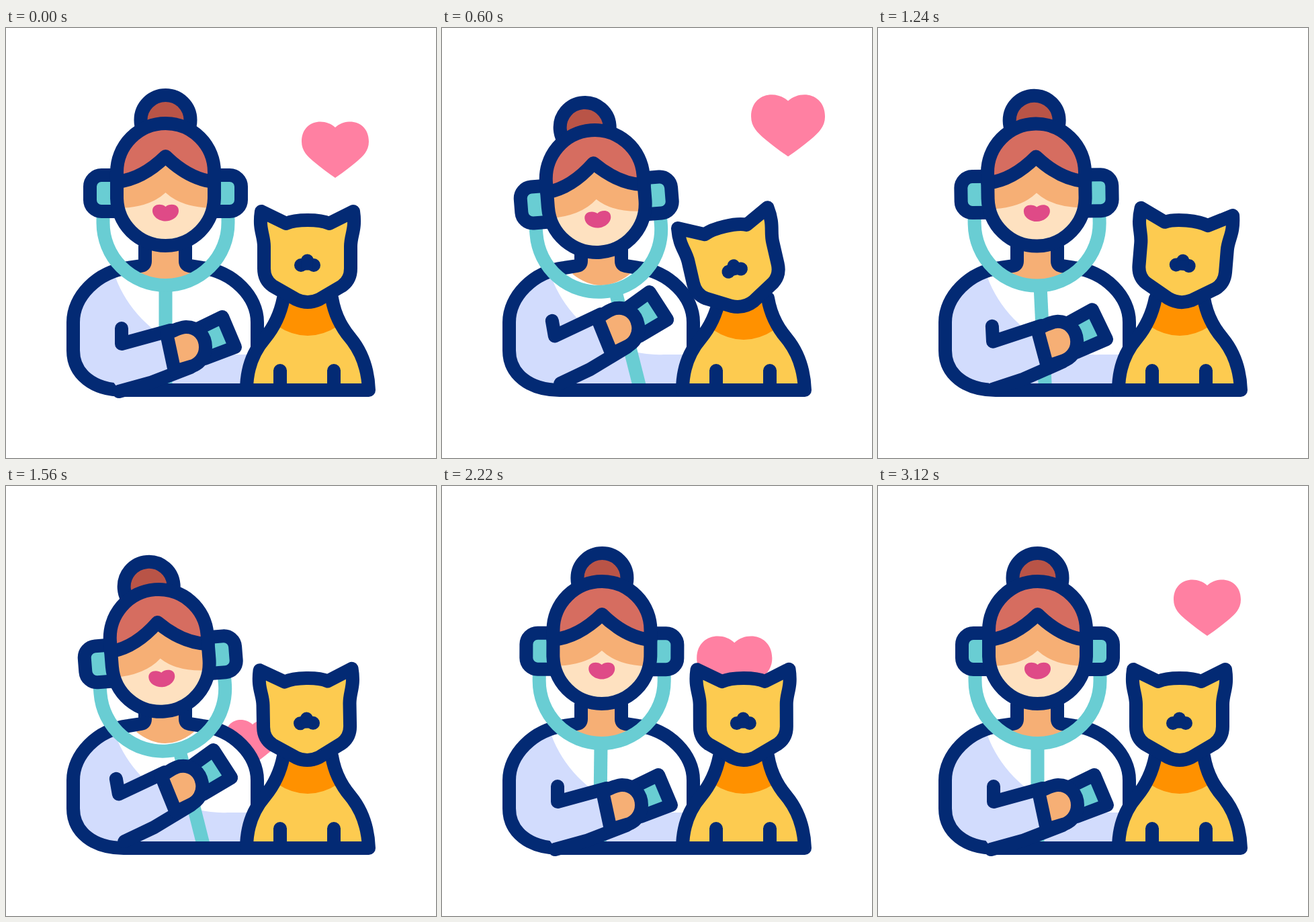
An HTML page for the animation above (3.6 s loop, 640 by 640 pixels).

```html
<!DOCTYPE html>
<html lang="en">
<head>
<meta charset="utf-8">
<title>Vet and pet</title>
<style>
  html, body { margin: 0; width: 100%; height: 100%; overflow: hidden; background: #fff; }
  svg { display: block; width: 100%; height: 100%; }
  .line { stroke: #032a74; stroke-width: 20; stroke-linecap: round; stroke-linejoin: round; }
  .tube { stroke: #69cdd3; stroke-width: 20; fill: none; }
  .open { fill: none; }
  .navy { fill: #032a74; }
  .cyan { fill: #69cdd3; }
  .skin { fill: #f6af75; }
  .coat { fill: #d2dcfd; }
  .fur { fill: #fdcb50; }
</style>
</head>
<body>
<svg viewBox="0 0 640 640">
  <defs>
    <path id="coat" d="M207 325V347Q207 353 201 354L182 357C135 363 100 400 100 438V480C100 515 130 539 175 539H374V438C374 400 339 363 292 357L273 354Q267 353 267 347V325"/>
    <path id="dogBody" d="M413 402C407 432 395 450 385 462C366 484 358 512 358 539H540C539 512 531 484 513 462C503 450 490 432 485 402"/>
    <path id="skull" d="M165 214.5A72.5 72.5 0 0 1 310 214.5V251.5A72.5 72.5 0 0 1 165 251.5Z"/>
    <clipPath id="coatClip"><use href="#coat"/></clipPath>
    <clipPath id="dogClip"><use href="#dogBody"/></clipPath>
    <clipPath id="skullClip"><use href="#skull"/></clipPath>
  </defs>

  <path id="heart" fill="#ff80a2" d="M0 -33C-17 -49 -50 -43 -50 -12C-50 2 -41 10 -33 17Q-15 32 0 42Q15 32 33 17C41 10 50 2 50 -12C50 -43 17 -49 0 -33Z"/>

  <!-- coat and neck -->
  <use href="#coat" fill="#fff"/>
  <g clip-path="url(#coatClip)">
    <path class="coat" d="M160 362C180 430 250 490 330 486H380V560H80V340Z"/>
    <path class="skin" d="M207 320H267V354L280 366Q237 400 194 366L207 354Z"/>
  </g>
  <path id="stem" class="tube" d="M237.5 385V535"/>
  <use href="#coat" class="line open"/>

  <!-- arm with the chest piece -->
  <g id="arm">
    <path class="coat" d="M172 470L245 449L252 512L170 541L140 500Z"/>
    <path class="line open" d="M172 447V470L245 450M168 541L215 528L275 505"/>
    <path class="line cyan" d="M287 447L322 430L341 475L296 492Z"/>
    <path class="line skin" d="M239 455Q260 445 268 445C286 445 297 459 297 475C297 491 286 501 275 504L251 511Z"/>
  </g>

  <!-- head and stethoscope -->
  <g id="head">
    <path class="tube" d="M144.5 278V290A93 93 0 0 0 330.5 290V278"/>
    <rect class="line cyan" x="125" y="219" width="60" height="54" rx="17"/>
    <rect class="line cyan" x="290" y="219" width="60" height="54" rx="17"/>
    <circle id="bun" class="line" fill="#b95447" cx="237.5" cy="137" r="37"/>
    <use href="#skull" class="skin"/>
    <g clip-path="url(#skullClip)">
      <path fill="#fee1c0" d="M165 268Q213 268 237.5 245Q262 268 310 268V340H165Z"/>
      <path fill="#d66d60" d="M165 229C195 226 218 210 237.5 191C257 210 280 226 310 229V130H165Z"/>
    </g>
    <path class="line open" d="M165 229C195 226 218 210 237.5 191C257 210 280 226 310 229"/>
    <use href="#skull" class="line open"/>
    <path fill="#df4a87" d="M237.5 266C232 261 218 261 218 272C218 281 228 287.500 237.5 287.500C247 287.500 257 281 257 272C257 261 243 261 237.5 266Z"/>
  </g>

  <!-- dog -->
  <use href="#dogBody" class="fur"/>
  <g clip-path="url(#dogClip)">
    <path id="collar" fill="#ff9100" d="M403 380H495V443Q449 473 403 443Z"/>
  </g>
  <path class="line open" d="M408 510V535M488 510V535"/>
  <use href="#dogBody" class="line open"/>
  <g id="dogHead">
    <path class="line fur" d="M384 358V325C384 308 376 300 380 273L417 291Q428 286 449 286Q470 286 481 291L517 273C521 300 513 308 513 325V358Q513 375 500 384L466 404Q449 412 432 404L397 384Q384 375 384 358Z"/>
    <g class="navy">
      <circle cx="439" cy="353" r="10"/>
      <circle cx="458" cy="353" r="10"/>
      <circle cx="448.500" cy="346" r="9.500"/>
      <rect x="440" y="346" width="17" height="14.500"/>
    </g>
  </g>
</svg>
<script>
const LOOP = 3600;
const el = id => document.getElementById(id);
const place = (id, transform) => el(id).setAttribute('transform', transform);

// Monotone cubic curve through [time, value] keys, flat at both ends and at every extremum.
function track(...keys) {
  const slope = i => (keys[i + 1][1] - keys[i][1]) / (keys[i + 1][0] - keys[i][0]);
  const tangents = keys.map((_, i) => {
    if (i === 0 || i === keys.length - 1) return 0;
    const a = slope(i - 1), b = slope(i);
    return a * b <= 0 ? 0 : 2 * a * b / (a + b);
  });
  return t => {
    const last = keys.length - 1;
    if (t <= keys[0][0]) return keys[0][1];
    if (t >= keys[last][0]) return keys[last][1];
    const i = keys.findIndex(k => k[0] > t) - 1;
    const [t0, v0] = keys[i], [t1, v1] = keys[i + 1];
    const d = t1 - t0, u = (t - t0) / d, w = 1 - u;
    return w * w * (1 + 2 * u) * v0 + u * u * (3 - 2 * u) * v1
      + d * u * w * (w * tangents[i] - u * tangents[i + 1]);
  };
}

const headTilt = track([0, 0], [540, -4.5], [620, -4.5], [940, 2.9], [1040, 2.4], [1500, -4.5], [1580, -4.5], [1940, 1.7], [2300, 0]);
const headDrop = track([0, 0], [540, 10], [620, 9.5], [940, -13], [1040, -10], [1520, 11.5], [1580, 11.5], [1940, 0]);
const armLift = track([0, 0], [520, 10], [640, 10], [900, 0], [1100, 0], [1500, 10], [1600, 10], [1900, 0]);
const dogTilt = track([0, 0], [600, -13], [940, 10], [1560, -1], [1940, -0.5], [2540, 0]);
const dogDrop = track([0, 0], [600, 6], [940, 1.5], [1300, 0]);
const heartOut = track([0, 490], [600, 515], [940, 540], [1140, 562]);
const heartIn = track([1200, 350], [1560, 367], [1940, 401], [2540, 468], [3120, 490]);
const heartSize = track([0, 1], [600, 1.1], [940, 1.13], [1180, 1.13], [1200, 0], [1560, 0.8], [1940, 1.13], [2540, 1.1], [3120, 1]);

function draw(t) {
  const tilt = headTilt(t), drop = headDrop(t);
  place('head', `translate(0 ${drop}) rotate(${tilt} 237.5 345)`);
  place('bun', `translate(${tilt * (tilt < 0 ? 1.9 : 0.7)} 0)`);
  place('stem', `translate(0 ${drop}) rotate(${tilt * 3.15} 237.5 300)`);
  place('arm', `rotate(${-armLift(t)} 104 488)`);

  place('dogHead', `translate(0 ${dogDrop(t)}) rotate(${dogTilt(t)} 449 410)`);
  place('collar', `translate(0 ${dogDrop(t)})`);

  const x = t < 1190 ? heartOut(t) : heartIn(t);
  const y = 181 - (x - 490) * (x > 490 ? 1.44 : 1.63);
  place('heart', `translate(${x} ${y}) scale(${heartSize(t)})`);
  const fade = t < 1190 ? Math.min(1, Math.max(0, (1180 - t) / 80)) : 1;
  el('heart').setAttribute('opacity', fade);
}

const start = performance.now();
function tick() {
  draw((performance.now() - start) % LOOP);
  requestAnimationFrame(tick);
}
draw(0);
requestAnimationFrame(tick);
</script>
</body>
</html>
```
